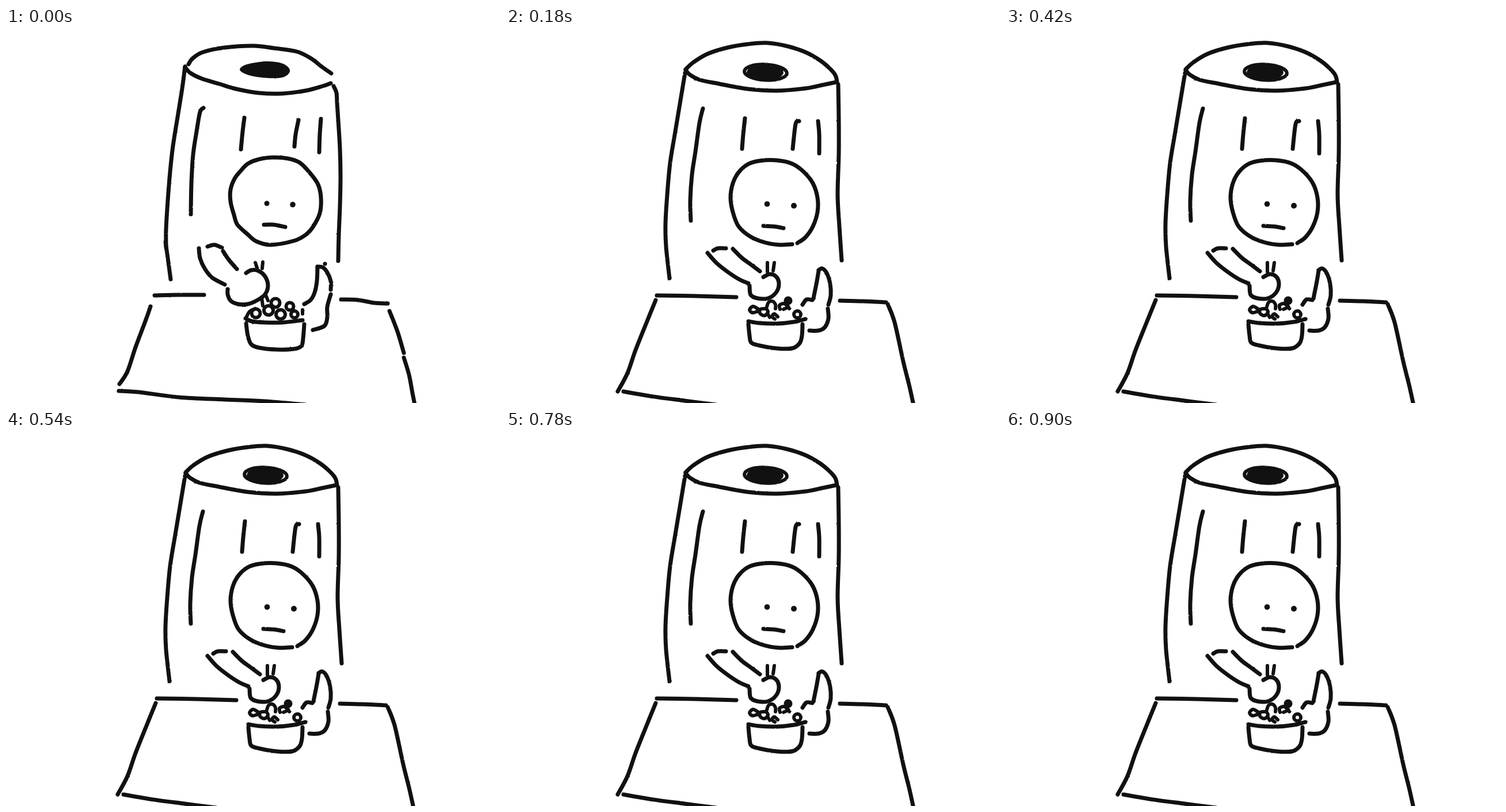
Animation, 858 px wide and 652 px high, one loop 960 ms. Source, as an HTML page:

```html
<!DOCTYPE html>
<html lang="en">
<head>
<meta charset="utf-8">
<title>Paper roll eating from a bowl</title>
<style>
  html, body { margin: 0; width: 100%; height: 100%; overflow: hidden; background: #fff; }
  svg { display: block; width: 858px; height: 652px; }
  .pose { fill: none; stroke: #111; stroke-width: 7; stroke-linecap: round; stroke-linejoin: round; visibility: hidden; }
  .thin { stroke-width: 6; }
  .ink { fill: #111; stroke: none; }
  .left  { animation: left 240ms step-end infinite; }
  .mid   { animation: mid 240ms step-end infinite; }
  .right { animation: right 240ms step-end infinite; }
  @keyframes left  { 0% { visibility: visible } 25%, 100% { visibility: hidden } }
  @keyframes mid   { 0%, 50% { visibility: hidden } 25%, 75% { visibility: visible } 100% { visibility: hidden } }
  @keyframes right { 0%, 75%, 100% { visibility: hidden } 50% { visibility: visible } }
</style>
</head>
<body>
<svg viewBox="0 0 858 652">
  <defs>
    <filter id="brush" filterUnits="userSpaceOnUse" x="0" y="0" width="858" height="652" color-interpolation-filters="sRGB">
      <feTurbulence type="fractalNoise" baseFrequency=".3" numOctaves="1" seed="4"/>
      <feDisplacementMap in="SourceGraphic" scale="2" xChannelSelector="R" yChannelSelector="G"/>
    </filter>
  </defs>

  <g class="pose left" filter="url(#brush)">
    <!-- roll -->
    <polyline points="317,63 324,53 342,42 380,34 430,31 465,35 505,41 530,53 548,67 565,79"/>
    <polyline points="311,68 320,78 340,88 370,97 400,106 440,113 480,114 520,109 550,101 564,96"/>
    <polyline points="311,67 306,105 298,155 290,205 285,250 281,300 278,350 278,382"/>
    <polyline points="277,372 281,400 286,437"/>
    <polyline points="569,101 574,113 575,130 577,160 580,210 581,260 580,310 578,360 577,405"/>
    <polyline points="343,139 337,146 331,180 325,220 322,270 321,324"/>
    <polyline points="414,156 411,180 408,211"/>
    <polyline points="508,160 503,185 501,206"/>
    <polyline points="547,158 545,185 544,216"/>
    <polyline class="ink" points="406,72 416,64 440,59 456,58 478,61 491,69 492,78 480,86 455,87 430,84 414,79 406,72"/>
    <!-- face -->
    <polyline points="420,236 440,228 465,225 490,227 510,234 528,252 542,272 547,295 545,322 533,346 520,360 500,370 460,377 435,371 420,359 402,342 396,325 390,302 390,281 397,262 408,248 420,236"/>
    <circle class="ink" cx="453" cy="305" r="4.5"/>
    <circle class="ink" cx="498" cy="307" r="4.8"/>
    <polyline points="448,342 465,342 485,346"/>
    <!-- arms -->
    <polyline points="350,380 362,377 375,382"/>
    <polyline points="335,383 337,400 345,418 358,434 380,446"/>
    <polyline points="377,388 387,403 401,419"/>
    <polyline points="417,426 426,421 438,422 450,432 455,448 450,463 437,473 420,480 403,480 390,474 385,463 385,454"/>
    <polyline class="thin" points="433,408 436,417"/>
    <polyline class="thin" points="446,407 445,418"/>
    <polyline class="thin" points="444,468 446,483"/>
    <polyline class="thin" points="451,464 455,474"/>
    <polyline points="541,415 540,440 536,460 529,473 518,480"/>
    <polyline points="541,415 550,416 558,425 564,440 564,455"/>
    <circle class="ink" cx="554" cy="410" r="3.5"/>
    <polyline points="564,463 558,485 558,503 553,518 533,525"/>
    <!-- bowl -->
    <polyline points="416,505 427,510 450,512 480,512 515,508"/>
    <polyline points="417,513 420,535 426,550 440,556 470,559 500,558 513,553 516,540 518,515"/>
    <g class="thin">
      <polyline points="417,504 423,493 433,488"/>
      <circle cx="434" cy="496" r="7.5"/>
      <circle cx="456" cy="491" r="8"/>
      <circle cx="468" cy="478" r="7.5"/>
      <circle cx="493" cy="484" r="6.5"/>
      <circle cx="477" cy="498" r="8"/>
      <circle cx="501" cy="498" r="6"/>
      <polyline points="515,490 515,497"/>
    </g>
    <!-- table -->
    <polyline points="258,465 300,464 344,464"/>
    <polyline points="582,472 612,473 640,478 663,479"/>
    <polyline points="251,484 243,507 225,555 211,597 197,619"/>
    <polyline points="666,492 680,528 691,565"/>
    <polyline points="691,573 700,603 706,635 711,660"/>
    <polyline points="196,631 230,633 300,642 380,646 450,649 520,655"/>
  </g>

  <g class="pose mid" filter="url(#brush)">
    <!-- roll -->
    <polyline points="312,72 325,60 350,45 385,34 420,28 455,26 490,32 520,42 545,56 562,70 572,82 575,94"/>
    <polyline points="312,73 319,81 336,90 370,97 420,106 470,109 520,105 550,99 574,94"/>
    <polyline points="311,78 304,120 294,180 285,235 280,290 277,340 278,380 284,435"/>
    <polyline points="577,98 578,160 578,220 576,290 579,345 583,404"/>
    <polyline points="342,140 336,165 329,215 323,255 320,300 321,335"/>
    <polyline points="415,157 412,185 410,210"/>
    <polyline points="509,162 503,167 498,210"/>
    <polyline points="542,162 544,185 544,218"/>
    <ellipse class="thin" cx="451" cy="77" rx="37" ry="13.5" transform="rotate(3 451 77)"/>
    <ellipse class="ink" cx="450" cy="77" rx="32" ry="14"/>
    <!-- face -->
    <polyline points="506,374 520,364 533,345 541,320 541,295 533,270 517,250 497,236 470,230 440,231 420,237 404,251 394,270 390,295 394,320 404,345 425,363 450,373 475,377 497,376"/>
    <circle class="ink" cx="453.500" cy="306" r="4.8"/>
    <circle class="ink" cx="500" cy="309" r="5"/>
    <polyline points="447,344 465,345 482,348"/>
    <!-- arms -->
    <polyline points="360,387 368,383 382,383"/>
    <polyline points="394,384 410,400 425,411 441,423"/>
    <polyline points="350,391 365,408 385,424 405,437 421,444"/>
    <polyline points="447,433 458,428 469,432 474,445 469,460 455,470 437,470 425,464 423,448"/>
    <polyline class="thin" points="454,408 454,424"/>
    <polyline class="thin" points="466,408 464,422"/>
    <polyline points="543,422 540,440 534,470"/>
    <polyline points="532,473 522,472 515,481"/>
    <polyline points="543,421 549,418 557,426 563,445 564,465 560,481"/>
    <polyline points="559,488 560,505 554,520 543,526 527,526"/>
    <!-- bowl -->
    <polyline points="421,510 440,513 470,514 500,511 520,506"/>
    <polyline points="421,515 423,535 426,547 440,552 470,557 497,557 510,548 514,535 515,515"/>
    <g class="thin">
      <polyline points="437,488 429,484 423,490 428,495 436,493"/>
      <polyline points="450,488 442,489 441,496 449,500 455,494 452,488"/>
      <polyline points="455,498 458,503"/>
      <polyline points="453,485 456,477 463,475 468,481 468,488"/>
      <polyline points="476,489 475,482 483,479 489,485 482,489"/>
      <circle class="ink" cx="490" cy="474" r="7.5"/>
      <polyline points="489,482 492,488"/>
      <polyline points="472,502 466,497 462,502 467,506"/>
      <circle cx="506" cy="498" r="6"/>
    </g>
    <!-- table -->
    <polyline points="262,465 330,466 400,468"/>
    <polyline points="580,474 620,475 660,477"/>
    <polyline points="260,473 245,510 225,560 211,600 194,632"/>
    <polyline points="204,632 250,640 310,648 365,655"/>
    <polyline points="663,480 675,512 690,580 700,620 708,656"/>
  </g>

  <g class="pose right" filter="url(#brush)">
    <!-- roll -->
    <polyline points="315,79 325,67 350,52 380,41 411,34 450,36 480,36 510,43 545,56 570,74 579,85 582,98 584,150 584,220 585,300 587,398"/>
    <polyline points="315,82 330,91 360,98 400,103 450,106 500,104 540,98 574,92"/>
    <polyline points="316,86 308,140 301,180 290,240 285,300 281,350 283,400 286,437"/>
    <polyline points="343,143 337,165 332,200 327,250 325,300 325,352"/>
    <polyline points="420,157 416,171 412,212"/>
    <polyline points="509,163 503,207"/>
    <polyline points="545,165 547,190 547,213"/>
    <polyline class="ink" points="412,75 417,65 435,61 460,65 479,71 489,82 485,91 465,92 440,88 420,83 412,75"/>
    <!-- face -->
    <polyline points="521,372 530,355 538,332 540,305 534,275 522,254 505,241 485,231 462,227 440,230 420,239 403,253 393,272 391,300 395,325 405,345 420,361 440,371 465,377 490,380 505,378 514,374"/>
    <circle class="ink" cx="453.500" cy="307" r="6"/>
    <circle class="ink" cx="501" cy="310" r="4.8"/>
    <polyline points="448,347 463,346 479,350"/>
    <!-- arms -->
    <polyline points="398,390 405,386 418,388 430,400 447,413 466,423"/>
    <polyline points="393,396 410,411 430,426 448,436"/>
    <polyline points="470,420 480,419 488,427 490,440 484,453 470,458 455,456 449,448 450,440"/>
    <polyline class="thin" points="485,403 484,418"/>
    <polyline class="thin" points="497,408 492,430"/>
    <polyline class="thin" points="472,460 472,480"/>
    <polyline class="thin" points="480,460 480,478"/>
    <polyline points="540,417 547,414 556,418 566,432 570,450 567,470 560,490 559,510 553,523 540,527 526,526"/>
    <polyline points="540,426 540,445 536,469"/>
    <polyline points="535,470 524,468 516,473 514,482"/>
    <!-- bowl -->
    <polyline points="424,513 450,514 490,514 517,509"/>
    <polyline points="424,513 423,530 424,547"/>
    <polyline points="424,547 445,552 470,559 495,558 508,550 514,535 518,514"/>
    <g class="thin">
      <polyline points="428,491 427,482 434,478 442,484 441,493"/>
      <polyline points="428,503 433,496 439,503"/>
      <circle cx="459" cy="478" r="7.5"/>
      <circle cx="456" cy="496" r="8"/>
      <circle cx="479" cy="486" r="7.5"/>
      <circle cx="499" cy="485" r="6.5"/>
      <circle cx="482" cy="499" r="7"/>
      <circle cx="506" cy="499" r="6"/>
    </g>
    <!-- table -->
    <polyline points="421,470 360,467 300,466 266,464"/>
    <polyline points="266,464 250,500 225,560 212,592 199,624"/>
    <polyline points="199,625 240,632 300,637 400,646 480,652 600,651 695,648"/>
    <polyline points="659,482 670,530 680,590 695,648"/>
    <polyline points="582,475 620,477 654,478"/>
  </g>
</svg>
<script>
  // Turn each polyline into a smooth curve through its points.
  const NS = 'http://www.w3.org/2000/svg';

  function smooth(pts) {
    const last = pts.length - 1;
    const closed = pts[0].x === pts[last].x && pts[0].y === pts[last].y;
    const at = i => {
      if (closed) return pts[(i + last) % last];
      return pts[Math.max(0, Math.min(last, i))];
    };
    let d = `M${pts[0].x} ${pts[0].y}`;
    for (let i = 0; i < last; i++) {
      const [a, b, c, e] = [at(i - 1), at(i), at(i + 1), at(i + 2)];
      d += `C${b.x + (c.x - a.x) / 6} ${b.y + (c.y - a.y) / 6} `
         + `${c.x - (e.x - b.x) / 6} ${c.y - (e.y - b.y) / 6} ${c.x} ${c.y}`;
    }
    return closed ? d + 'Z' : d;
  }

  for (const line of document.querySelectorAll('polyline')) {
    const path = document.createElementNS(NS, 'path');
    path.setAttribute('d', smooth([...line.points]));
    path.setAttribute('class', line.getAttribute('class') || '');
    line.replaceWith(path);
  }
</script>
</body>
</html>
```
